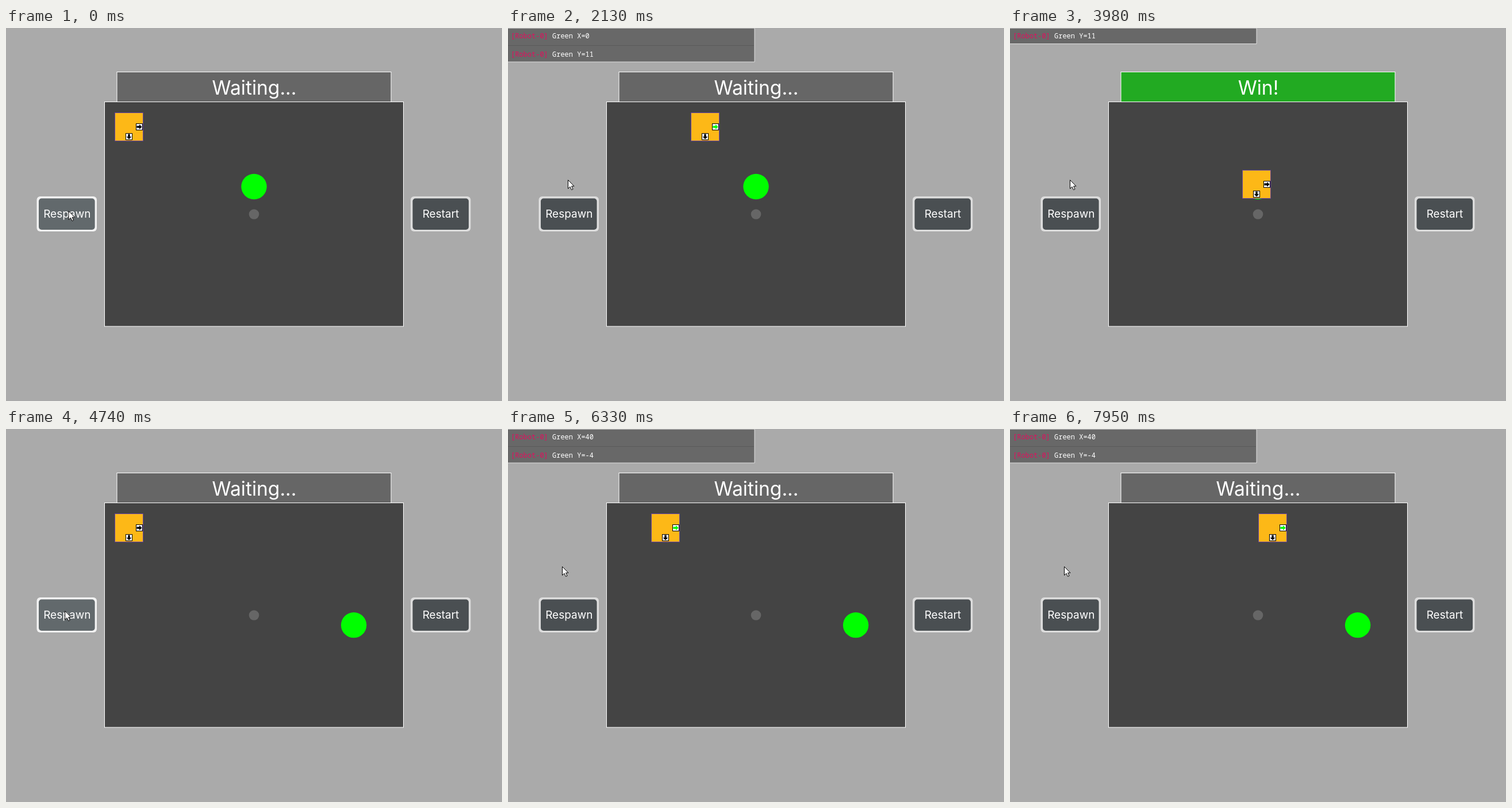
These frames come from a looping animation (863x649 px, 7990 ms). An HTML page:

```html
<!DOCTYPE html>
<html lang="en">
<head>
<meta charset="utf-8">
<title>Robot target game</title>
<style>
  html, body { margin: 0; width: 100%; height: 100%; overflow: hidden; background: #aaa; }
  svg { display: block; width: 863px; height: 649px; }
  text { fill: #fff; font-family: Inter, sans-serif; }
  .title { font-size: 33.6px; text-anchor: middle; }
  .button text { font-size: 19px; text-anchor: middle; }
  .button .rim { fill: #ddd; }
  .button .face { fill: #4a4f52; }
  .button.hover .rim { fill: #f2f2f2; }
  .button.hover .face { fill: #62696c; }
  .log text { font: 12px "Noto Sans Mono", monospace; white-space: pre; }
  .log .who { fill: #e0105e; }
</style>
</head>
<body>
<svg viewBox="0 0 863 649">
  <defs>
    <g id="pad">
      <rect x="-5.5" y="-5.5" width="11" height="11" fill="#fff" stroke="#000"/>
      <path d="M-4.5-1.7H0V-4.3L4.6 0 0 4.3V1.7H-4.5Z"/>
    </g>
  </defs>

  <rect id="banner" x="193" y="76.5" width="477" height="53" stroke="#fff"/>
  <text id="status" class="title" x="432" y="115.5"></text>
  <rect x="171.5" y="128.5" width="520" height="390.6" fill="#444" stroke="#fff"/>
  <circle cx="431.5" cy="324" r="8.8" fill="#666"/>
  <circle id="goal" r="22.2" fill="#0f0"/>

  <g id="robot">
    <rect x="-24.5" y="-24.5" width="49" height="49" fill="#fdb817" stroke="#6a45a0"/>
    <use id="padX" href="#pad" x="18"/>
    <use id="padY" href="#pad" transform="translate(0 17) rotate(90)"/>
  </g>

  <g id="respawn" class="button">
    <rect class="rim" x="53.5" y="293" width="104.5" height="61" rx="6"/>
    <rect class="face" x="57" y="296.5" width="97.6" height="54.5" rx="5"/>
    <text x="106.3" y="330.2">Respawn</text>
  </g>
  <g class="button">
    <rect class="rim" x="704" y="293" width="104.5" height="61" rx="6"/>
    <rect class="face" x="707.5" y="296.5" width="97.6" height="54.5" rx="5"/>
    <text x="756.5" y="330.2">Restart</text>
  </g>

  <g id="log" class="log">
    <rect id="panel" width="429" fill="#686868"/>
    <path id="divider" d="M0 30.5H428" stroke="#5a5a5a"/>
    <path id="edge" fill="none" stroke="#e0e0e0"/>
    <text x="5" y="18"><tspan class="who">[Robot-0]</tspan><tspan id="line0"></tspan></text>
    <text x="5" y="49.5"><tspan class="who">[Robot-0]</tspan><tspan id="line1"></tspan></text>
  </g>

  <path id="cursor" d="M.5.5V15.5L4 12.2 6.5 17.6 9 16.5 6.6 11.2H11Z" fill="#fff" stroke="#000"/>
</svg>

<script>
const LOOP = 7990, STEP = 47.5;
const SPEED = 0.1096, LAG = 123, PAD_LAG = 60;
const ORIGIN = { x: 431.5, y: 323.8 }, UNIT = 4.34;
const HOME = { x: 214.4, y: 171.9 };
const RIGHT_ON = 824, RIGHT_OFF = 2785, DOWN_ON = 2836, DOWN_OFF = 3770;
const RESET = 4700, SECOND_RUN = 5670, SECOND_ON = 5617;
const $ = id => document.getElementById(id);

// Distance travelled under thrust against drag, coasting to rest afterwards.
const thrustPath = dt => dt <= 0 ? 0 : SPEED * (dt - LAG * (1 - Math.exp(-dt / LAG)));
const travel = (t, on, off = Infinity) => thrustPath(t - on) - thrustPath(t - off);

const rise = dt => dt <= 0 ? 0 : 1 - Math.exp(-dt / PAD_LAG);
const padColor = (t, on, off = Infinity) =>
  `rgb(0,${Math.round(255 * (rise(t - on) - rise(t - off)))},0)`;

const cursorPath = [
  [0, 108.5, 318], [192, 104, 264], [4250, 104, 264], [4500, 103, 318],
  [4770, 102, 316], [4830, 98, 274], [4925, 94, 239], [LOOP, 94, 239]
];
function cursorAt(t) {
  const i = cursorPath.findIndex(p => p[0] > t);
  const [t0, x0, y0] = cursorPath[i - 1], [t1, x1, y1] = cursorPath[i];
  const k = (t - t0) / (t1 - t0);
  return [x0 + (x1 - x0) * k, y0 + (y1 - y0) * k];
}

// The picture advances in even steps, re-aligned at the start of each run.
function snap(t) {
  const base = t < 840 ? 50 : t < SECOND_RUN ? 840 : SECOND_RUN;
  return Math.max(0, base + Math.floor((t - base + 1) / STEP) * STEP);
}

function showLog(lines) {
  $('log').style.display = lines.length ? '' : 'none';
  const h = lines.length > 1 ? 59 : 27.5;
  $('panel').setAttribute('height', h);
  $('edge').setAttribute('d', `M0 .2H429V${h}H0`);
  $('divider').style.display = lines.length > 1 ? '' : 'none';
  [0, 1].forEach(i => {
    $('line' + i).textContent = lines[i] ? ' ' + lines[i] : '';
    $('line' + i).parentNode.style.display = lines[i] ? '' : 'none';
  });
}

function draw(t) {
  const second = t >= RESET;
  const goal = second ? { x: 40, y: -4 } : { x: 0, y: 11 };
  const lines = [`Green X=${goal.x}`, `Green Y=${goal.y}`];
  let { x, y } = HOME, colorX = '#000', colorY = '#000';

  if (t >= SECOND_RUN) {
    x += travel(t, SECOND_ON);
    colorX = padColor(t, SECOND_ON);
  } else if (!second && t >= 840) {
    x += travel(t, RIGHT_ON, RIGHT_OFF);
    y += travel(t, DOWN_ON, DOWN_OFF);
    colorX = padColor(t, RIGHT_ON, RIGHT_OFF);
    colorY = padColor(t, DOWN_ON, DOWN_OFF);
  }
  $('robot').setAttribute('transform', `translate(${Math.round(x)} ${Math.round(y)})`);
  $('padX').setAttribute('fill', colorX);
  $('padY').setAttribute('fill', colorY);
  $('goal').setAttribute('cx', ORIGIN.x + goal.x * UNIT);
  $('goal').setAttribute('cy', ORIGIN.y - goal.y * UNIT);

  const won = t >= DOWN_OFF && t < RESET;
  $('banner').setAttribute('fill', won ? '#2a2' : '#666');
  $('status').textContent = won ? 'Win!' : 'Waiting...';

  const running = t >= SECOND_RUN || (t >= 840 && t < 4069);
  showLog(!running ? [] : t >= 3930 && !second ? lines.slice(1) : lines);

  const [cx, cy] = cursorAt(t);
  $('cursor').setAttribute('transform', `translate(${cx} ${cy})`);
  $('respawn').classList.toggle('hover', cx > 53 && cx < 158 && cy > 293 && cy < 354);
}

function frame() {
  draw(snap(performance.now() % LOOP));
  requestAnimationFrame(frame);
}
frame();
</script>
</body>
</html>
```
